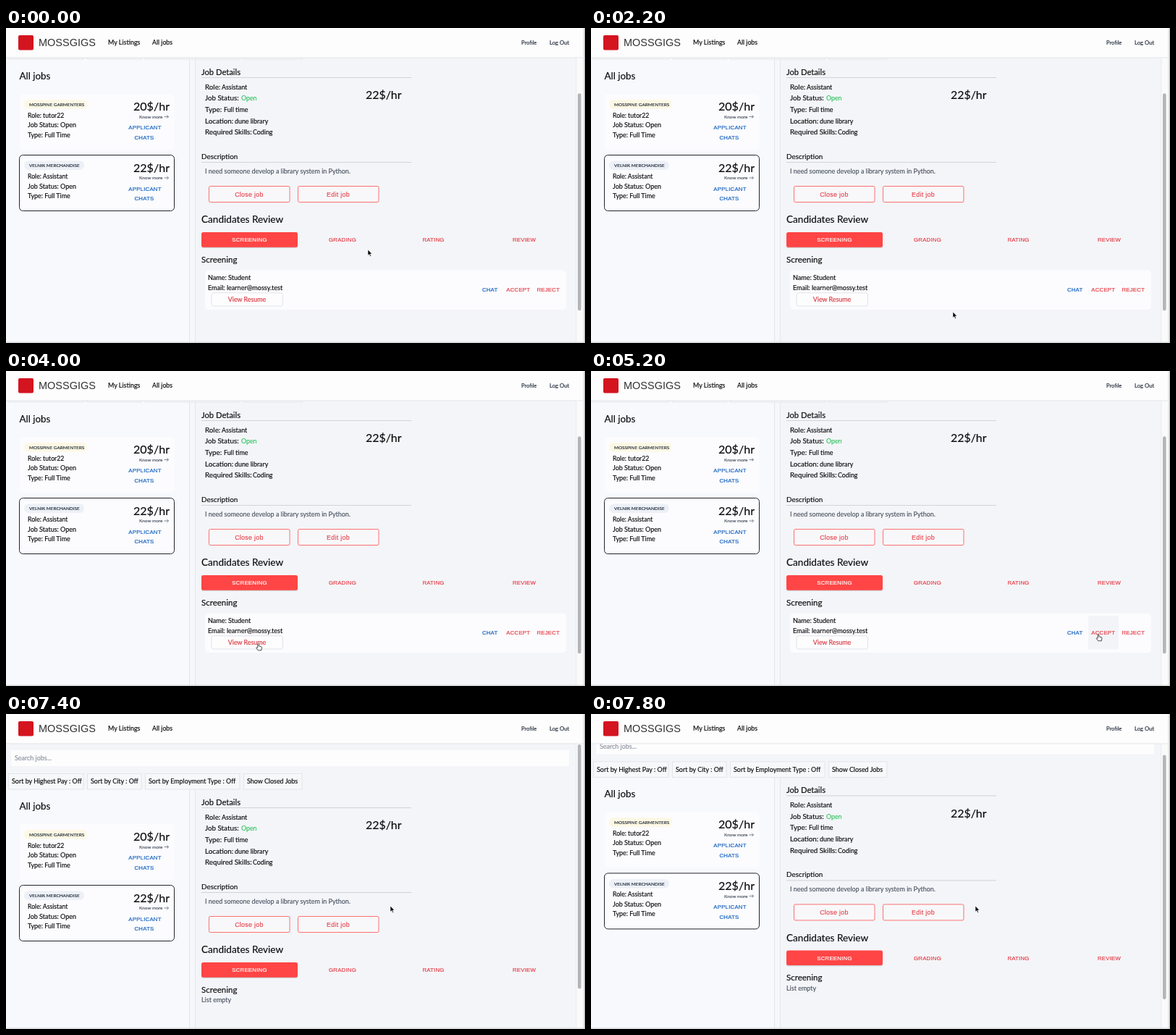
These frames come from a looping animation (800 px wide and 435 px high, 8 s). An HTML page:

```html
<!DOCTYPE html>
<html lang="en">
<head>
<meta charset="utf-8">
<title>Job board</title>
<style>
  html, body { margin: 0; width: 100%; height: 100%; overflow: hidden; background: #f4f5f8; }
  svg { display: block; width: 100vw; height: 100vh; }
  text { white-space: pre; }
  .body { font-family: Lato, "Open Sans", sans-serif; stroke-width: .16px; }
  .plain { font-family: "Liberation Sans", Arial, sans-serif; stroke-width: 0; }
  .caps { font-family: "Liberation Sans", Arial, sans-serif; font-size: 7.8px; letter-spacing: .22px; text-anchor: middle; stroke-width: .2px; }
  .action { font-family: "Liberation Sans", Arial, sans-serif; font-size: 8.9px; letter-spacing: .3px; text-anchor: middle; stroke-width: .12px; }
</style>
</head>
<body>
<svg id="stage" viewBox="0 0 800 435" preserveAspectRatio="none"></svg>
<script>
const LOOP = 8000, STEP = 200;
const RELOAD = 6400, LOADED = 6600, SELECTED = 7000;
const INK = '#0c0c0e', MUTED = '#4b5563', LINE = '#e3e5e9';
const RED = '#e53e48', SOLID_RED = '#ff4545', BLUE = '#1763bf';

const paint = color => `fill="${color}" stroke="${color}"`;
const text = (x, y, str, size = 8.95, color = INK, extra = '') =>
  `<text x="${x}" y="${y}" font-size="${size}" ${paint(color)} ${extra}>${str}</text>`;
const caps = (x, y, str, color = RED) => `<text class="caps" x="${x}" y="${y}" ${paint(color)}>${str}</text>`;
const rect = (x, y, w, h, fill, extra = '') =>
  `<rect x="${x}" y="${y}" width="${w}" height="${h}" fill="${fill}" ${extra}/>`;
const group = (id, content, attrs = '') => `<g id="${id}" ${attrs}>${content}</g>`;
const rule = y => rect(270, y, 290, 1, '#d0d3d8');

function panels() {
  return rect(0, 104, 253, 500, '#f8f9fc') + rect(253, 104, 1, 500, LINE) +
    rect(254, 104, 7, 500, '#f6f7fa') + rect(261, 104, 1, 500, '#e6e8ec') +
    rect(7, 50, 771, 22, '#fdfdfe');
}

function filters(boxes) {
  const labels = ['Sort by Highest Pay : Off', 'Sort by City : Off', 'Sort by Employment Type : Off', 'Show Closed Jobs'];
  return labels.map((label, i) => {
    const [left, right] = boxes[i];
    return rect(left + .5, 82.5, right - left - 1, 21.5, '#f7f8fa', `stroke="${LINE}" stroke-width="1"`) +
      text(left + 5, 96.2, label);
  }).join('');
}

function jobCard(y, { company, chipWidth, chipFill, role, pay, id }) {
  const arrow = `<path d="M218.5 ${y + 31.5}h6m-2.2 -2.2l2.2 2.2l-2.2 2.2" fill="none" stroke="${MUTED}" stroke-width=".7"/>`;
  return rect(18.5, y, 214, 77, '#fcfcfe', `rx="5" stroke-width="1" id="${id}"`) +
    rect(25, y + 8, chipWidth, 12.5, chipFill, 'rx="6"') +
    text(32, y + 16.8, company, 6.4, '#1f2937') +
    text(30, y + 32.5, 'Role: ' + role, 8.7) +
    text(30, y + 46, 'Job Status: Open', 9) +
    text(30, y + 59.5, 'Type: Full Time') +
    text(226, y + 23, pay, 16.1, INK, 'text-anchor="end"') +
    text(184, y + 33.8, 'Know more', 6.4, MUTED) + arrow +
    caps(192, y + 49, 'APPLICANT', BLUE) + caps(191, y + 62.7, 'CHATS', BLUE);
}

function jobList() {
  return jobCard(91, { id: 'card1', company: 'MOSSPINE GARMENTERS', chipWidth: 87, chipFill: '#fdf8e4', role: 'tutor22', pay: '20$/hr' }) +
    jobCard(175.5, { id: 'card2', company: 'VELNIK MERCHANDISE', chipWidth: 83, chipFill: '#edf1f7', role: 'Assistant', pay: '22$/hr' });
}

function jobDetails() {
  const facts = [
    ['Role:', 298, 'Assistant'], ['Job Status:', 325, 'Open', '#2fc25f'], ['Type:', 301, 'Full time'],
    ['Location:', 316, 'dune library'], ['Required Skills:', 341, 'Coding']
  ].map(([label, x, value, color], i) => {
    const y = 84.8 + i * 15.65;
    return text(275, y, label, 9.8) + text(x, y, value, 8.85, color);
  }).join('');
  const outlined = (x, label) =>
    rect(x + .5, 218.5, 111.5, 22, '#f8f8fa', `rx="2" stroke="${SOLID_RED}" stroke-width=".75"`) +
    `<text class="action" x="${x + 56}" y="232.8" ${paint(RED)}>${label}</text>`;
  return text(270, 64.8, 'Job Details', 11.2) + rule(68) + facts +
    text(497, 98.3, '22$/hr', 15.9) +
    text(270, 180.8, 'Description', 9.9) + rule(185) +
    text(275, 200.5, 'I need someone develop a library system in Python.', 8.95, MUTED) +
    outlined(280, 'Close job') + outlined(403, 'Edit job') +
    text(270, 269.2, 'Candidates Review', 13.6) +
    rect(270, 283.2, 133, 20.8, '#00000022', 'rx="2.5"') + rect(270, 282, 133, 20.7, SOLID_RED, 'rx="2.5"') +
    caps(336.5, 295.2, 'SCREENING', '#fff') + caps(465, 295.2, 'GRADING') +
    caps(590.5, 295.2, 'RATING') + caps(716, 295.2, 'REVIEW') +
    text(270, 323.7, 'Screening', 11.5);
}

function candidate() {
  return rect(275, 334.5, 499, 54.5, '#fcfcfe', 'rx="5"') +
    rect(687, 338, 42, 46, '#f3f4f7', 'rx="2" id="hover"') +
    text(279, 348.3, 'Name: Student', 9.05) +
    text(279, 361.8, 'Email: learner@mossy.test', 9.05) +
    rect(284, 365.8, 98.5, 18.2, '#fdfdfe', 'rx="3" stroke="#dcdfe4" stroke-width=".9"') +
    text(333, 378.2, 'View Resume', 8.85, '#d9363f', 'text-anchor="middle"') +
    caps(668.7, 364.3, 'CHAT', BLUE) + caps(707.8, 364.3, 'ACCEPT') + caps(749.3, 364.3, 'REJECT');
}

const prompt = text(469, 311, 'Nothing to show!', 8.95, '#b6babf') +
  text(469, 324.5, 'Select a job for more details', 8.95, '#b6babf');

const page = group('page',
  panels() +
  group('ready',
    text(12, 64.2, 'Search jobs...', 8.95, '#8b919b') +
    filters([[3, 107.5], [112, 187.5], [192, 323.5], [328, 409.5]]) +
    text(18.5, 131.8, 'All jobs', 13.4) +
    group('prompt', prompt) +
    group('jobs', jobList(), 'transform="translate(0 61)"') +
    group('details', jobDetails() + group('candidate', candidate()) +
      group('empty', text(270, 337.2, 'List empty', 9, MUTED)), 'transform="translate(0 61)"'),
    'class="body"') +
  group('loading',
    text(12, 64.2, 'Search jobs...', 8.95, '#8b919b') +
    filters([[3, 112], [116, 192], [196, 328], [332, 416.5]]) +
    text(18.5, 131.8, 'All jobs', 13.3) + prompt,
    'class="plain"'));

const header = rect(0, 0, 800, 41, '#fdfdfe') + rect(0, 40.5, 797, 1, '#e1e3e7') +
  group('readyHeader',
    rect(17, 10, 21, 20.5, '#d4141f', 'rx="2"') +
    text(45, 25.3, 'MOSSGIGS', 14.5, '#333', 'class="plain"') +
    text(141, 23.4, 'My Listings') + text(202, 23.4, 'All jobs', 8.75) +
    text(712, 23, 'Profile', 7.5, '#1f2937') + text(751, 23, 'Log Out', 7.75, '#1f2937'),
    'class="body"') +
  group('loadingHeader',
    text(32, 23.4, 'My Listings') + text(95, 23.4, 'All jobs') +
    text(706, 23, 'Profile', 7.8, '#1f2937', 'font-weight="bold"') +
    text(748, 23, 'Log Out', 7.8, '#1f2937', 'font-weight="bold"'),
    'class="plain"');

const frame = rect(788, 41.5, 9, 394, '#fafafb') + rect(787.5, 41.5, .8, 394, '#e8e9eb') +
  rect(790, 42, 4.6, 300, '#b4b5b7', 'rx="2.3" id="thumb"') +
  rect(797, 0, 2, 435, '#ececee') + rect(799, 0, 1, 435, '#bcbdbf') +
  rect(0, 433.6, 800, 1, '#c6c7c9');

const cursor = group('cursor',
  '<path id="arrow" d="M0 0V8.2L1.9 6.5L3.2 9.4L4.5 8.8L3.2 6H5.7Z" fill="#000" stroke="#fff" stroke-width=".6"/>' +
  '<path id="hand" d="M-.8 .6Q0 -.6 .8 .6V3.4L4 4Q5 4.3 4.9 5.5L4.3 9.2H-.3L-2.7 6Q-2.8 4.6 -.8 5.6Z" fill="#fff" stroke="#222" stroke-width=".8" stroke-linejoin="round"/>');

document.getElementById('stage').innerHTML = page + header + frame + cursor;

const el = id => document.getElementById(id);
const show = (id, visible) => el(id).setAttribute('display', visible ? 'inline' : 'none');
const inside = (p, left, top, right, bottom) => p.x >= left && p.x <= right && p.y >= top && p.y <= bottom;

// time, x, y of the pointer tip
const pointerPath = [
  [0, 500, 306], [400, 500, 306], [1200, 500, 368], [1800, 500, 397], [2200, 500, 392], [2600, 470, 389],
  [3200, 348.5, 376.5], [4000, 348.5, 376.5], [4800, 680, 366], [5200, 701, 363.5], [6000, 702, 363.5],
  [6400, 708, 362.8], [6800, 212, 267], [7000, 212, 267], [7400, 531, 265], [8000, 531, 265]
];

function pointerAt(t) {
  const i = pointerPath.findIndex(p => p[0] > t);
  const [t0, x0, y0] = pointerPath[i - 1], [t1, x1, y1] = pointerPath[i];
  const u = (t - t0) / (t1 - t0), k = u * u * (3 - 2 * u);
  return { x: x0 + (x1 - x0) * k, y: y0 + (y1 - y0) * k };
}

function scrollAt(t) {
  if (t < RELOAD) return 61;
  return 16.6 * Math.max(0, (t - 7400) / 400) ** 2;
}

function draw(t) {
  const before = t < RELOAD, loading = t >= RELOAD && t < LOADED;
  const selected = before || t >= SELECTED;
  const scroll = scrollAt(t), p = pointerAt(t);
  const onAccept = before && inside(p, 687, 338, 729, 384);
  const onResume = before && inside(p, 284, 366, 383, 384);
  const onKnowMore = t >= LOADED && inside(p, 182, 262, 228, 273);
  const hand = onAccept || onResume || onKnowMore;

  el('page').setAttribute('transform', `translate(0 ${-scroll})`);
  show('ready', !loading);
  show('readyHeader', !loading);
  show('loading', loading);
  show('loadingHeader', loading);
  show('prompt', !selected);
  show('details', selected);
  show('candidate', before);
  show('empty', !before);
  show('hover', onAccept);
  el('card2').setAttribute('stroke', selected ? '#20242b' : 'none');

  el('thumb').setAttribute('y', 42 + scroll * (before ? .79 : .88));
  el('thumb').setAttribute('height', before ? 300 : 337.5);
  el('cursor').setAttribute('transform', `translate(${p.x} ${p.y})`);
  show('hand', hand);
  show('arrow', !hand);
}

const start = performance.now();
function tick() {
  const t = (performance.now() - start) % LOOP;
  draw(Math.floor(t / STEP) * STEP);
  requestAnimationFrame(tick);
}
tick();
</script>
</body>
</html>
```
